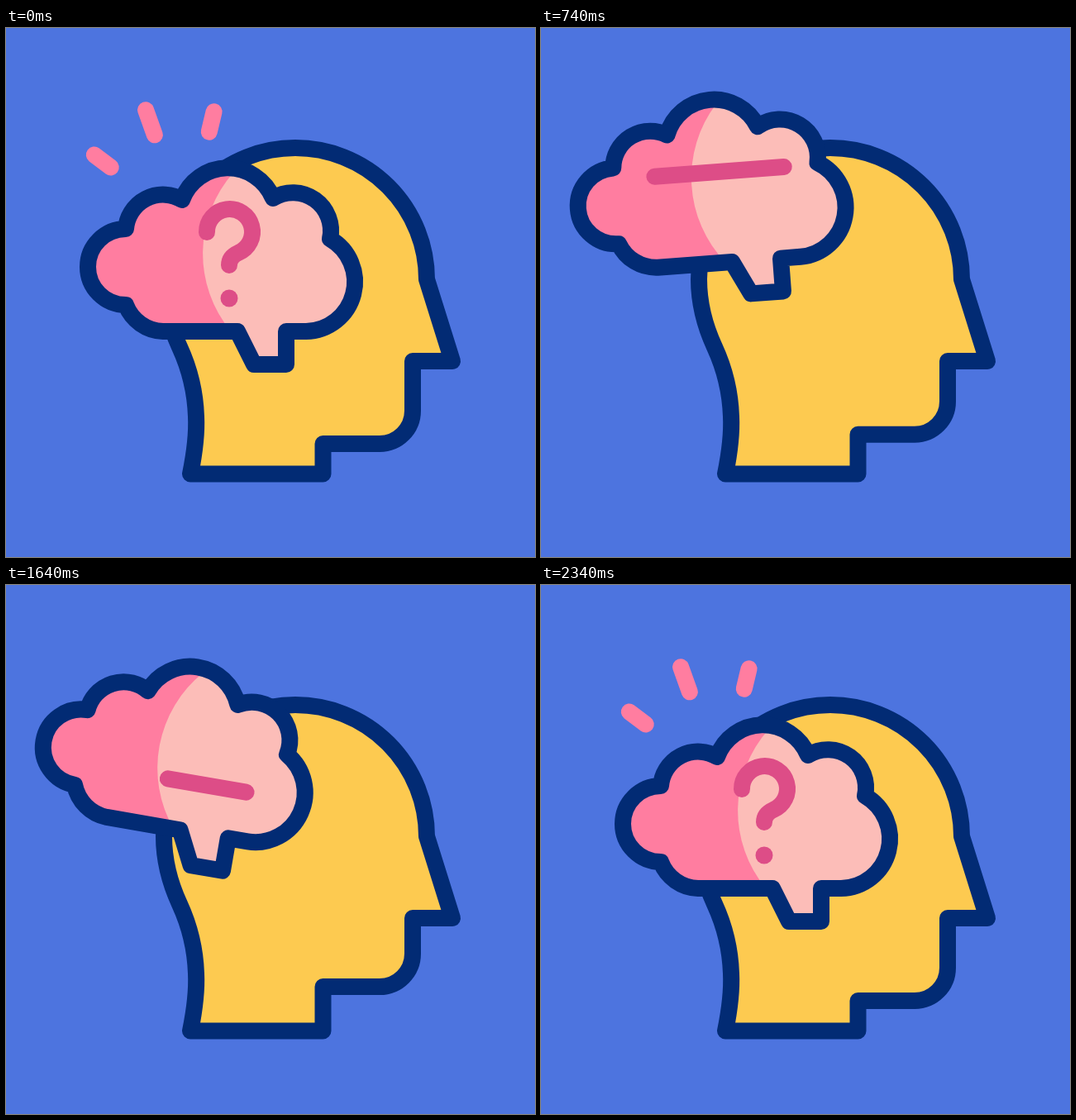
These frames come from a looping animation (640 by 640 pixels, 2.4 s). An HTML page with a canvas:

```html
<!DOCTYPE html>
<html lang="en">
<head>
<meta charset="utf-8">
<title>Thinking head</title>
<style>
  html, body { margin: 0; width: 100%; height: 100%; overflow: hidden; background: #4d74df; }
  canvas { display: block; width: 640px; height: 640px; }
</style>
</head>
<body>
<canvas id="stage" width="640" height="640"></canvas>
<script>
const ctx = document.getElementById('stage').getContext('2d');
const LOOP = 2400, STEP = 20, RAD = Math.PI / 180;
const NAVY = '#022b74', YELLOW = '#fdca50', PINK = '#ff7da0', PALE = '#fcbdb8', MAGENTA = '#dd4d87';
const PIVOT = [261, 284];

const cloud = new Path2D(`M190 367 A50 50 0 0 1 145 335 A46 46 0 0 1 145 243
  A45 45 0 0 1 213 208 A59 59 0 0 1 323 206 A46 46 0 0 1 392 255
  A60 60 0 0 1 363 367 H339 V407 H300 L280 367 Z`);
const paleSide = new Path2D('M275 175 A148 148 0 0 0 272 367 V420 H450 V150 H275 Z');
const hook = new Path2D('M243 247 A27.5 27.5 0 1 1 281 272 Q270 277 270 287');
const HOOK_LENGTH = 134;

const lerp = (a, b, u) => a + (b - a) * u;
const ramp = (t, from, to) => Math.min(1, Math.max(0, (t - from) / (to - from)));

// Moves through the values, reaching each at its own time
const through = (t, times, values) =>
  values.reduce((v, next, i) => i ? lerp(v, next, ramp(t, times[i - 1], times[i])) : next);

function pose(t) {
  const out = ramp(t, 200, 560) - ramp(t, 1840, 2200);
  const beats = [560, 960, 1380, 1780];
  return {
    x: -55 * out,
    y: -out * through(t, beats, [108, 51, 102, 57]),
    jaw: out * through(t, beats, [0, 25, 0, 26]),
    tilt: out * through(t, [500, 1190, 1620, 1840], [0, -12.3, 12, -12.3]),
    idea: 1 - ramp(t, 200, 380) + ramp(t, 2160, 2340)
  };
}

function stroke(path, color) {
  ctx.strokeStyle = color;
  ctx.stroke(path);
}

function segment(x0, y0, x1, y1, color) {
  const path = new Path2D();
  path.moveTo(x0, y0);
  path.lineTo(x1, y1);
  stroke(path, color);
}

function drawHead(jaw) {
  const head = new Path2D(`M223 539.5 C229 510 231 490 230 470 C229 440 222 412 210 386
    C198 360 191 335 191 304 A159 159 0 0 1 509 304 L540 403 H492
    V${463 - jaw} A40 40 0 0 1 452 ${503 - jaw} H383.5 V539.5 Z`);
  ctx.fillStyle = YELLOW;
  ctx.fill(head);
  stroke(head, NAVY);
}

function drawQuestion(size) {
  if (size <= 0) return;
  ctx.setLineDash(size < 1 ? [HOOK_LENGTH * size, 300] : []);
  stroke(hook, MAGENTA);
  ctx.setLineDash([]);
  ctx.fillStyle = MAGENTA;
  ctx.beginPath();
  ctx.arc(270, 327, 10.5 * size, 0, 7);
  ctx.fill();
}

// A line of thought: grows from the left, then is erased from the left
function drawThought(t, start, y) {
  const middle = start + 280;
  const head = ramp(t, start, middle), tail = ramp(t, middle, middle + 280);
  if (head > tail) segment(lerp(174, 351, tail), y, lerp(174, 351, head), y, MAGENTA);
}

function drawCloud(t, { x, y, tilt, idea }) {
  ctx.save();
  ctx.translate(PIVOT[0] + x, PIVOT[1] + y);
  ctx.rotate(tilt * RAD);
  ctx.translate(-PIVOT[0], -PIVOT[1]);
  ctx.fillStyle = PINK;
  ctx.fill(cloud);
  ctx.save();
  ctx.clip(cloud);
  ctx.fillStyle = PALE;
  ctx.fill(paleSide);
  ctx.restore();
  stroke(cloud, NAVY);
  drawQuestion(idea);
  drawThought(t, 428, 257);
  drawThought(t, 1232, 308.5);
  ctx.restore();
}

// Three rays fanning out from one point
function drawSparks(size) {
  if (size <= 0) return;
  for (let i = 0; i < 3; i++) {
    const angle = (217 + 33.2 * i) * RAD, dx = Math.cos(angle), dy = Math.sin(angle);
    const inner = 115.5, outer = inner + (i === 1 ? 32 : 25) * size;
    segment(219 + dx * inner, 238 + dy * inner, 219 + dx * outer, 238 + dy * outer, PINK);
  }
}

function frame() {
  const t = Math.floor(performance.now() % LOOP / STEP) * STEP;
  const now = pose(t);
  ctx.fillStyle = '#4d74df';
  ctx.fillRect(0, 0, 640, 640);
  ctx.lineWidth = 20;
  ctx.lineCap = ctx.lineJoin = 'round';
  drawHead(now.jaw);
  drawCloud(t, now);
  drawSparks(now.idea);
  requestAnimationFrame(frame);
}
frame();
</script>
</body>
</html>
```
